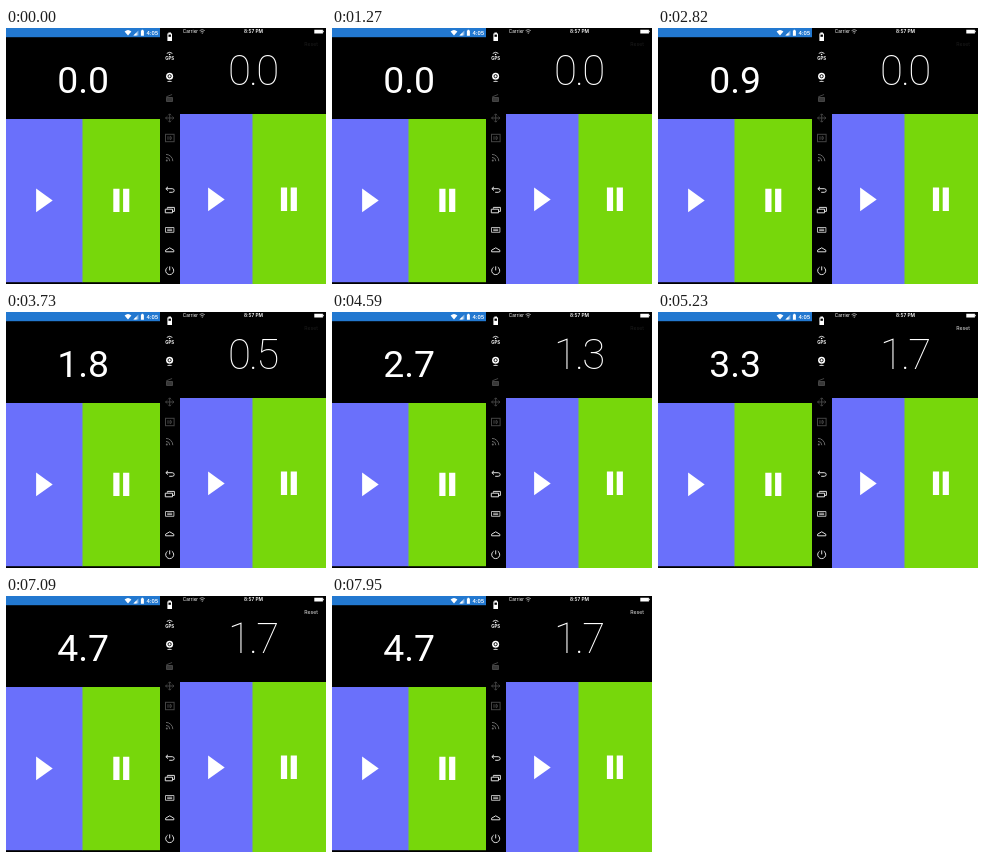
These frames come from a looping animation (320x256 px, 8000 ms). An HTML page:

```html
<!DOCTYPE html>
<html lang="en">
<head>
<meta charset="utf-8">
<title>Two stopwatches</title>
<style>
html, body { margin: 0; width: 100%; height: 100%; overflow: hidden; background: #000; }
svg { display: block; width: 100vw; height: 100vh; }
.line { fill: none; stroke: #dcdcdc; stroke-width: 1; }
.dim { fill: none; stroke: #444; stroke-width: 1; }
.droid { font-family: Roboto, sans-serif; fill: #fff; }
.phone { font-family: Inter, Roboto, sans-serif; fill: #fff; }
</style>
</head>
<body>
<svg viewBox="0 0 320 256">
  <defs>
    <path id="play" d="M0 0L16.6 11.8L0 23.6Z" fill="#fff"/>
    <path id="pause" d="M0 0h6.2v23.4H0zM9.8 0h6.2v23.4H9.8z" fill="#fff"/>
  </defs>
  <rect width="320" height="256"/>

  <!-- left device -->
  <rect width="154" height="9.2" fill="#2278d0"/>
  <g fill="#fff">
    <path d="M122 7.6L118.6 3.6Q122 .6 125.4 3.6Z"/>
    <path d="M127.4 7.6h5V2.6z" fill-opacity=".5"/>
    <path d="M127.4 7.6h3.2V4.4z"/>
    <path d="M134.9 2.6h.8v-.8h1.4v.8h.8v5.2h-3z"/>
  </g>
  <text class="droid" x="152" y="7" font-size="5.8" font-weight="500" text-anchor="end">4:05</text>
  <rect y="91" width="77" height="163.2" fill="#6a70fb"/>
  <rect x="76.5" y="91" width="77.5" height="163.2" fill="#77d70b"/>
  <use href="#play" x="30.1" y="160.6"/>
  <use href="#pause" x="107.3" y="160.7"/>
  <text id="left" class="droid" x="77.2" y="65.2" font-size="37.4" text-anchor="middle">0.0</text>

  <!-- tool strip -->
  <rect x="154" width="20" height="256"/>
  <g fill="#fff">
    <path d="M162.4 5.4V4.5h2.6v.9h1v7.6h-4.6V5.4z"/>
    <rect x="162.5" y="6.6" width="2.4" height="2.2" fill="#000"/>
    <circle cx="163.6" cy="26.5" r=".8"/>
    <circle cx="163.6" cy="48.2" r="3.5"/>
    <path d="M160.8 53.8q2.8-2.2 5.6 0z"/>
  </g>
  <circle cx="163.6" cy="48.2" r="1.6" fill="#fff" stroke="#000" stroke-width=".9"/>
  <path class="line" d="M160.8 25.4q2.8-2.2 5.6 0" stroke-width=".8"/>
  <text class="phone" x="163.7" y="31.9" font-size="4.4" font-weight="700" text-anchor="middle">GPS</text>
  <g class="dim">
    <path d="M160.5 69.5h6v4h-6zM160.3 68.8l5.8-2.3" fill="#383838"/>
    <path d="M163.7 86v8M159.7 90h8M162.2 87.3l1.5-1.5 1.5 1.5M162.2 92.7l1.5 1.5 1.5-1.5M161 88.5l-1.5 1.5 1.5 1.5M166.4 88.5l1.5 1.5-1.5 1.5"/>
    <rect x="159.5" y="106.3" width="8.6" height="7.4"/>
    <path d="M162 108.2v3.6M164 108.4v3.2h.8q1.2-1.6 0-3.2z"/>
    <path d="M160 126.4a6.8 6.8 0 0 1 6.8 6.8M160 129.4a3.8 3.8 0 0 1 3.8 3.8" stroke="#666"/>
  </g>
  <circle cx="160.8" cy="132.4" r="1" fill="#666"/>
  <g class="line">
    <path d="M162 158.8l-2.2 1.9 2.2 1.9M160 160.7h6.2q2 0 2 1.8t-2 1.8h-3"/>
    <path d="M161.4 180.6v-1.2h7v4h-1.4M159.3 181.2h7.2v3.6h-7.2z"/>
    <path d="M159.5 199.5h8.4v4.8h-8.4zM161.2 201.2h5M161.2 202.6h5" stroke-width=".8"/>
    <path d="M159.6 223.8v-1.6l4.1-2.4 4.1 2.4v1.6z"/>
    <path d="M161.6 239.2a4 4 0 1 0 4.2 0M163.7 238.4v4"/>
  </g>

  <!-- right device -->
  <text class="phone" x="176.8" y="5.4" font-size="4.7">Carrier</text>
  <g fill="none" stroke="#bbb" stroke-width=".8">
    <path d="M193.6 2.6q2.6-2 5.2 0M194.6 4q1.6-1.3 3.2 0"/>
    <circle cx="196.2" cy="5.1" r=".3"/>
  </g>
  <text class="phone" x="247.5" y="5.4" font-size="4.8" font-weight="600" text-anchor="middle">8:57 PM</text>
  <path d="M308.3 1.7h8.6v3.7h-8.6zM317.3 2.8h.7v1.5h-.7z" fill="#fff"/>
  <rect x="174" y="86" width="73" height="170" fill="#6a70fb"/>
  <rect x="246.5" y="86" width="73.5" height="170" fill="#77d70b"/>
  <use href="#play" x="202.1" y="159.6"/>
  <use href="#pause" x="274.9" y="159.5"/>
  <text id="right" class="droid" x="246.7" y="56.6" font-size="42" font-weight="100" letter-spacing="-1.8" text-anchor="middle">0.0</text>
  <text id="reset" class="phone" x="312" y="17.8" font-size="5.2" text-anchor="end">Reset</text>
</svg>
<script>
const LOOP = 8000;
const byId = id => document.getElementById(id);
const left = byId('left'), right = byId('right'), reset = byId('reset');

// Elapsed tenths since start, held at the paused value.
const tenths = (t, start, stop) =>
  Math.max(0, Math.min(stop, Math.floor((t - start) / 100)));

const show = (node, n) => { node.textContent = (n / 10).toFixed(1); };

function draw(t) {
  show(left, t < 2010 ? 0 : tenths(t, 1885, 47));
  show(right, tenths(t, 3205, 17));
  reset.style.fill = t < 4960 ? '#1c1c1c' : '#e4e4e4';
}

function tick() {
  draw(performance.now() % LOOP);
  requestAnimationFrame(tick);
}
draw(0);
tick();
</script>
</body>
</html>
```
